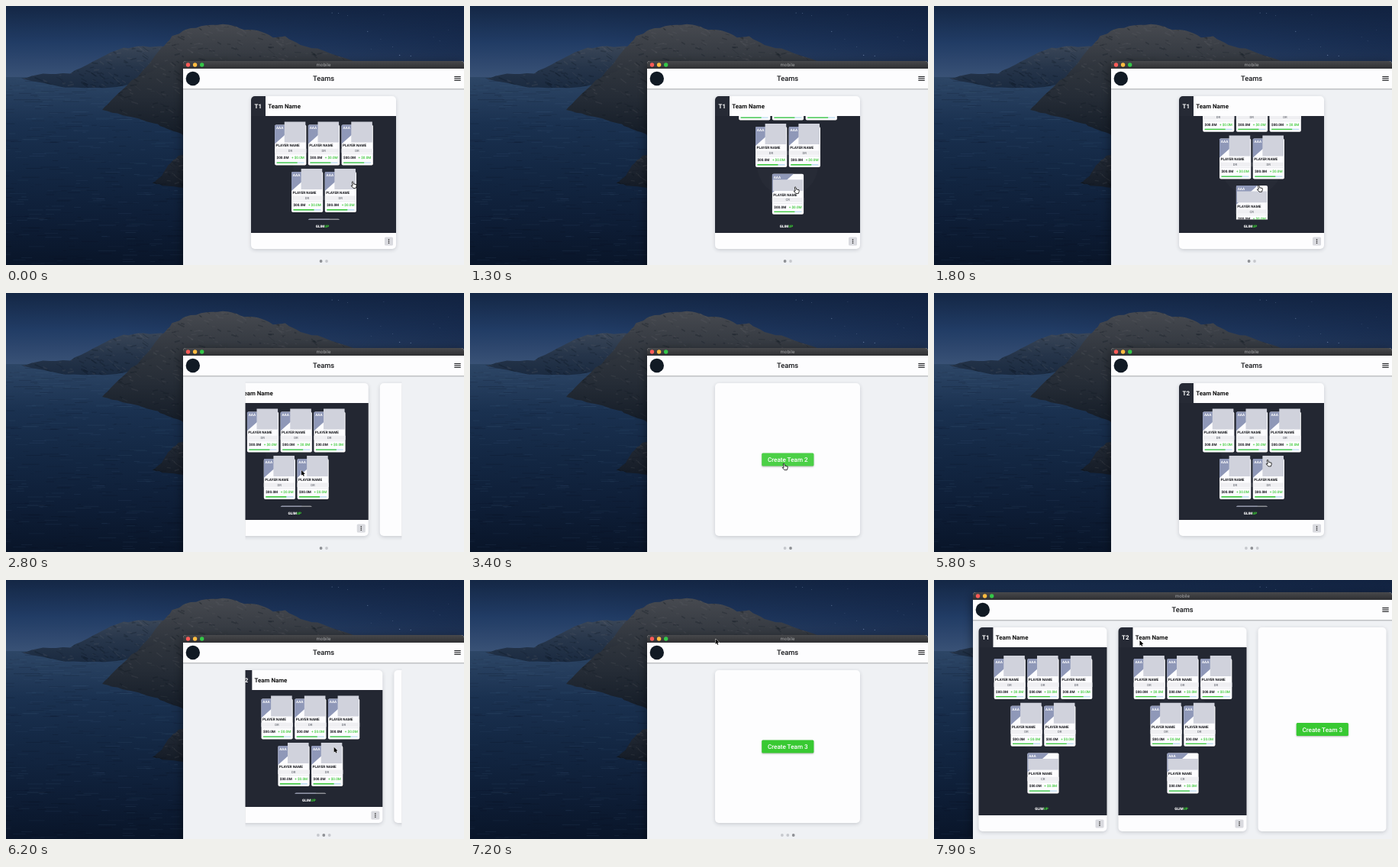
Recreate the animation shown at these times as an HTML page with a canvas. Size 600 by 339 pixels, loop 8000 ms.

```html
<!DOCTYPE html>
<html lang="en">
<head>
<meta charset="utf-8">
<title>Teams</title>
<style>
html, body { margin: 0; width: 100%; height: 100%; overflow: hidden; background: #0d1a30; }
canvas { display: block; width: 600px; height: 339px; }
</style>
</head>
<body>
<canvas id="stage"></canvas>
<script>
const W = 600, H = 339, LOOP = 8000, STEP = 100;
const SLIDE = 205, GAP = 7.5, MADE = 4100;
const MARK = '#262a35', PHOTO = '#d0d2dc', GREEN = '#39c934', TINT = '#8f98b8';
const dpr = window.devicePixelRatio || 1;

// Where the hand rests: [time, x, y]
const STOPS = [[0, 454, 230], [1300, 426, 237], [2400, 424, 232], [2800, 387, 232], [3800, 424, 218.5],
  [4900, 437, 218.5], [6000, 437, 218.5], [6700, 400, 220], [7200, 321.5, 77], [7500, 321.5, 77], [7900, 269.5, 79]];

const part = (t, a, b) => Math.min(1, Math.max(0, (t - a) / (b - a)));
const ease = (t, a, b) => { const p = part(t, a, b); return p * p * (3 - 2 * p); };
const flick = (t, a) => part(t, a, a + 800) ** 2.5;
const scrollOf = (t, down, up) => 59 * (ease(t, down, down + 700) - ease(t, up, up + 600));
const shiftOf = t => SLIDE * (flick(t, 2400) + flick(t, 5900));

function pointerAt(t) {
  const n = Math.max(1, STOPS.findIndex(s => s[0] >= t));
  const [a, x, y] = STOPS[n - 1], [b, x2, y2] = STOPS[n];
  const p = ease(t, a, b);
  return [x + (x2 - x) * p, y + (y2 - y) * p];
}
const overButton = ([x, y]) => Math.abs(x - 416) < 34 && Math.abs(y - 218) < 9;
const onCreate = t => (t >= 3200 && t < MADE) || t >= 6700;

function layer() {
  const canvas = document.createElement('canvas');
  return setUp(canvas);
}
function setUp(canvas) {
  canvas.width = W * dpr;
  canvas.height = H * dpr;
  const ctx = canvas.getContext('2d');
  ctx.scale(dpr, dpr);
  ctx.textRendering = 'geometricPrecision';
  return ctx;
}
let c;

function rect(x, y, w, h, fill, r = 0) {
  c.fillStyle = fill;
  c.beginPath();
  c.roundRect(x, y, w, h, r);
  c.fill();
}
function disc(x, y, r, fill) {
  c.fillStyle = fill;
  c.beginPath();
  c.arc(x, y, r, 0, 7);
  c.fill();
}
function poly(points, fill) {
  c.fillStyle = fill;
  c.beginPath();
  for (let i = 0; i < points.length; i += 2) c.lineTo(points[i], points[i + 1]);
  c.closePath();
  c.fill();
}
function text(s, x, y, size, weight, fill, align = 'left', family = 'Roboto') {
  c.font = `${weight} ${size}px ${family}, sans-serif`;
  c.textAlign = align;
  c.fillStyle = fill;
  c.fillText(s, x, y);
}
function fade(x0, y0, x1, y1, ...colours) {
  const g = c.createLinearGradient(x0, y0, x1, y1);
  colours.forEach((col, i) => g.addColorStop(i / (colours.length - 1), col));
  return g;
}
const down = (y0, y1, ...colours) => fade(0, y0, 0, y1, ...colours);
function lifted(col, blur, dy, paint) {
  c.save();
  c.shadowColor = col;
  c.shadowBlur = blur * dpr;
  c.shadowOffsetY = dy * dpr;
  paint();
  c.restore();
}
function clipped(x, y, w, h, paint) {
  c.save();
  c.beginPath();
  c.rect(x, y, w, h);
  c.clip();
  paint();
  c.restore();
}

let seed = 7;
const rnd = (a = 1, b = 0) => {
  seed = seed * 16807 % 2147483647;
  return b + (a - b) * seed / 2147483647;
};

// Rough outline through a few points, filled and flecked with slanted strokes.
function land(points, top, foot, ...colours) {
  const rough = [];
  for (let i = 0; i < points.length; i += 2) {
    const x = points[i], y = points[i + 1];
    const x2 = points[(i + 2) % points.length], y2 = points[(i + 3) % points.length];
    for (let k = 0; k < 4; k++)
      rough.push(x + (x2 - x) * k / 4 + rnd(.6, -.6), y + (y2 - y) * k / 4 + rnd(.8, -.8));
  }
  c.save();
  poly(rough, down(top, foot, ...colours));
  c.clip();
  for (let i = 0; i < 500; i++) {
    const x = rnd(480, 20), y = rnd(foot, top), s = rnd(9, 2);
    c.strokeStyle = i % 2 ? 'rgba(105,108,112,.16)' : 'rgba(8,14,24,.22)';
    c.lineWidth = rnd(2, .6);
    c.beginPath();
    c.moveTo(x, y);
    c.lineTo(x + s, y + s * rnd(.9, -.3));
    c.stroke();
  }
  c.restore();
}

function landscape() {
  rect(0, 0, W, 96, down(0, 96, '#142745', '#213c65', '#3b5377'));
  rect(0, 0, W, 96, fade(150, 0, W, 0, 'rgba(15,30,60,0)', 'rgba(15,30,60,.55)'));
  rect(0, 93, W, H - 93, down(93, H, '#2d4666', '#1a3150', '#132743', '#0e1e37', '#091529'));
  for (let i = 0; i < 500; i++) {
    const y = 96 + 243 * rnd() ** 1.4;
    rect(rnd(240, -20), y, rnd(24, 4), rnd(1.1, .4), i % 2 ? 'rgba(90,125,165,.11)' : 'rgba(3,10,24,.16)');
  }
  for (let i = 0; i < 14; i++) disc(rnd(W, 420), rnd(68, 4), rnd(.6, .3), 'rgba(160,185,220,.6)');
  land([20, 95, 48, 89, 84, 88, 102, 79, 126, 66, 148, 56, 172, 53, 204, 53, 245, 70, 190, 100, 130, 107, 76, 107],
    52, 108, '#3a4657', '#26354a', '#1a2a40');
  land([170, 96, 204, 55, 218, 40, 236, 31, 262, 25, 292, 24, 312, 31, 330, 32, 350, 41, 366, 40,
    386, 51, 416, 58, 450, 71, 480, 80, 480, 170, 232, 170], 23, 120, '#474a50', '#333840', '#1c242f');
  land([126, 136, 140, 121, 165, 97, 190, 86, 220, 72, 290, 66, 330, 172, 240, 172, 210, 160, 195, 153, 153, 143],
    66, 172, '#343940', '#252c36', '#131b26');
  land([192, 232, 204, 222, 212, 209, 226, 196, 250, 190, 250, 240, 210, 236], 190, 240, '#262d38', '#131a25');
}

function player(x, y, captain) {
  lifted('rgba(0,0,0,.3)', 1, .5, () => rect(x, y, 41.2, 53, '#fcfcfe', 2));
  poly([x + 1, y, x + 28, y, x, y + 25, x, y + 1], TINT);
  if (captain) rect(x + 1, y + 7.5, 39.4, 14.7, PHOTO);
  else rect(x + 12.6, y - 4, 27.6, 27, PHOTO);
  text('AAA', x + 1.8, y + 5.8, 4.7, 700, '#fff');
  text('PLAYER NAME', x + 1.4, y + 28.9, 4.65, 700, '#17181c');
  rect(x, y + 31.3, 41.2, 5.6, '#efeff2');
  text(captain ? 'CR' : 'DR', x + 20.4, y + 35.5, 4.3, 500, '#777a82', 'center');
  rect(x + 1, y + 38.2, 39.2, .5, '#dcdde2');
  text('$00.0M', x + 2.4, y + 45, 4.6, 700, '#17181c');
  text('+ $0.0M', x + 38.7, y + 45, 4.6, 500, GREEN, 'right');
  rect(x + 2.5, y + 49, 36, 1.3, '#b9dcf0');
  rect(x + 2.5, y + 49, 27, 1.3, GREEN);
}

const panel = (x, y, w, h) =>
  lifted('rgba(40,45,60,.2)', 5, 1.5, () => rect(x, y, w, h, '#fdfdfe', 5));

function team(n, x, y, w, h, scroll, wide) {
  const mid = x + w / 2, top = y + 26, end = y + h - 21;
  panel(x, y, w, h);
  rect(x, y, 19, 26, MARK, [5, 0, 0, 0]);
  text('T' + n, x + 9.3, y + 15.7, 7.9, 700, '#fff', 'center');
  text('Team Name', x + 22.2, y + 15.7, 7.9, 700, '#111');
  rect(x, top, w, end - top, '#232732');
  disc(mid, (top + end) / 2 - 12, 40, '#272b36');
  clipped(x, top, w, wide ? 204 : 135.6, () => {
    const first = top + (wide ? 15 : 11.4) - scroll;
    [3, 2, 1].forEach((count, row) => {
      for (let i = 0; i < count; i++)
        player(mid - 20.1 + (i - (count - 1) / 2) * 43.75, first + row * 61.7, row === 2);
    });
  });
  text('GLIM', mid + 1, end - 7, 4.7, 900, '#fff', 'right');
  text('UP', mid + 1.2, end - 7, 4.7, 900, GREEN);
  rect(x + w - 15, end + 5.5, 11, 11, '#d9dadf', 1.5);
  for (let i = -1; i < 2; i++) disc(x + w - 9.5, end + 11 + i * 2.3, .8, '#222');
}

function create(n, x, y, w, h, hover) {
  const mid = x + w / 2, cy = y + h / 2;
  panel(x, y, w, h);
  lifted('rgba(0,0,0,.28)', 2, .8, () =>
    rect(mid - 33.8, cy - 8.4, 68.2, 17, hover ? '#4bd046' : '#38c932', 1.5));
  text('Create Team ' + n, mid + .3, cy + 3.1, 8.1, 500, '#fff', 'center');
}

function slides(t, left, top, wide) {
  const mid = (left + W) / 2, y = top + 46;
  const span = wide ? (W - left) / 3 : SLIDE;
  const start = wide ? left : mid - span / 2;
  const w = span - GAP * 2, h = wide ? 329 - y : 200;
  const teams = t < MADE ? 1 : 2, shift = wide ? 0 : shiftOf(t);
  clipped(start, top + 37, wide ? W - left : span, H, () => {
    for (let i = 0; i <= teams; i++) {
      const x = start + GAP + i * span - shift;
      const scroll = wide ? 0 : i ? scrollOf(t, 4400, 5200) : scrollOf(t, 100, 1600);
      if (i < teams) team(i + 1, x, y, w, h, scroll, wide);
      else create(i + 1, x, y, w, h, onCreate(t) && overButton(pointerAt(t)));
    }
  });
  if (wide) return;
  const count = t < MADE + 200 ? 2 : 3, active = Math.round(shift / span);
  for (let i = 0; i < count; i++)
    disc(mid + .3 + (i - (count - 1) / 2) * 7.4, top + 262, 1.9, i === active ? '#8e9095' : '#c6c8cd');
}

function app(t) {
  const zoom = ease(t, 7500, 7900), wide = zoom > .8;
  const left = 232 - 181 * zoom, top = 72 - 56 * zoom, mid = (left + W) / 2, width = W - left;
  lifted('rgba(0,0,0,.5)', 13, 4, () => rect(left, top, width, H + 20 - top, '#eff1f4', [4, 4, 0, 0]));
  slides(t, left, top, wide);
  rect(left, top + 36, width, 2.5, down(top + 36, top + 38.5, 'rgba(0,0,0,.25)', 'rgba(0,0,0,0)'));
  rect(left, top + 10, width, 26, '#fdfdfe');
  rect(left, top, width, 10, down(top, top + 10, '#48494c', '#3b3c3f', '#2f3033'), [4, 4, 0, 0]);
  ['#fc5b57', '#fdbc40', '#34c748'].forEach((col, i) => disc(left + 6.5 + i * 9.1, top + 5, 2.7, col));
  text('mobile', mid, top + 7.1, 6, 400, '#a9aaac', 'center', 'Inter');
  text('Teams', mid, top + 26.4, 9.3, 500, '#16171a', 'center');
  disc(left + 12.8, top + 23, 9.2, '#111a24');
  for (let i = -1; i < 2; i++) rect(587.3, top + 22.4 + i * 2.4, 8.4, 1.1, '#1b1c1f');
}

function pointer(t) {
  const spot = pointerAt(t);
  const dragging = shiftOf(t) % SLIDE > 0;
  const arrow = dragging || (onCreate(t) && !overButton(spot));
  c.save();
  c.translate(...spot);
  c.lineJoin = 'round';
  if (arrow) {
    c.strokeStyle = '#fff';
    c.lineWidth = 1;
    poly([0, 0, 0, 6.8, 1.6, 5.4, 2.7, 7.8, 3.8, 7.3, 2.8, 5, 4.8, 4.8], '#000');
    c.stroke();
    c.fill();
  } else {
    c.strokeStyle = '#000';
    c.lineWidth = .8;
    poly([-.7, .3, .2, -.2, 1, .6, 1.6, 3, 5, 3.7, 5.2, 5.6, 4.3, 8.4, .9, 8.4, -1.8, 5.2, .2, 5], '#fff');
    c.stroke();
  }
  c.restore();
}

// The backdrop never changes, so paint it once.
const backdrop = c = layer();
landscape();
c = setUp(document.getElementById('stage'));

function frame() {
  const t = Math.floor(performance.now() % LOOP / STEP) * STEP;
  c.drawImage(backdrop.canvas, 0, 0, W, H);
  app(t);
  pointer(t);
  requestAnimationFrame(frame);
}
frame();
</script>
</body>
</html>
```
